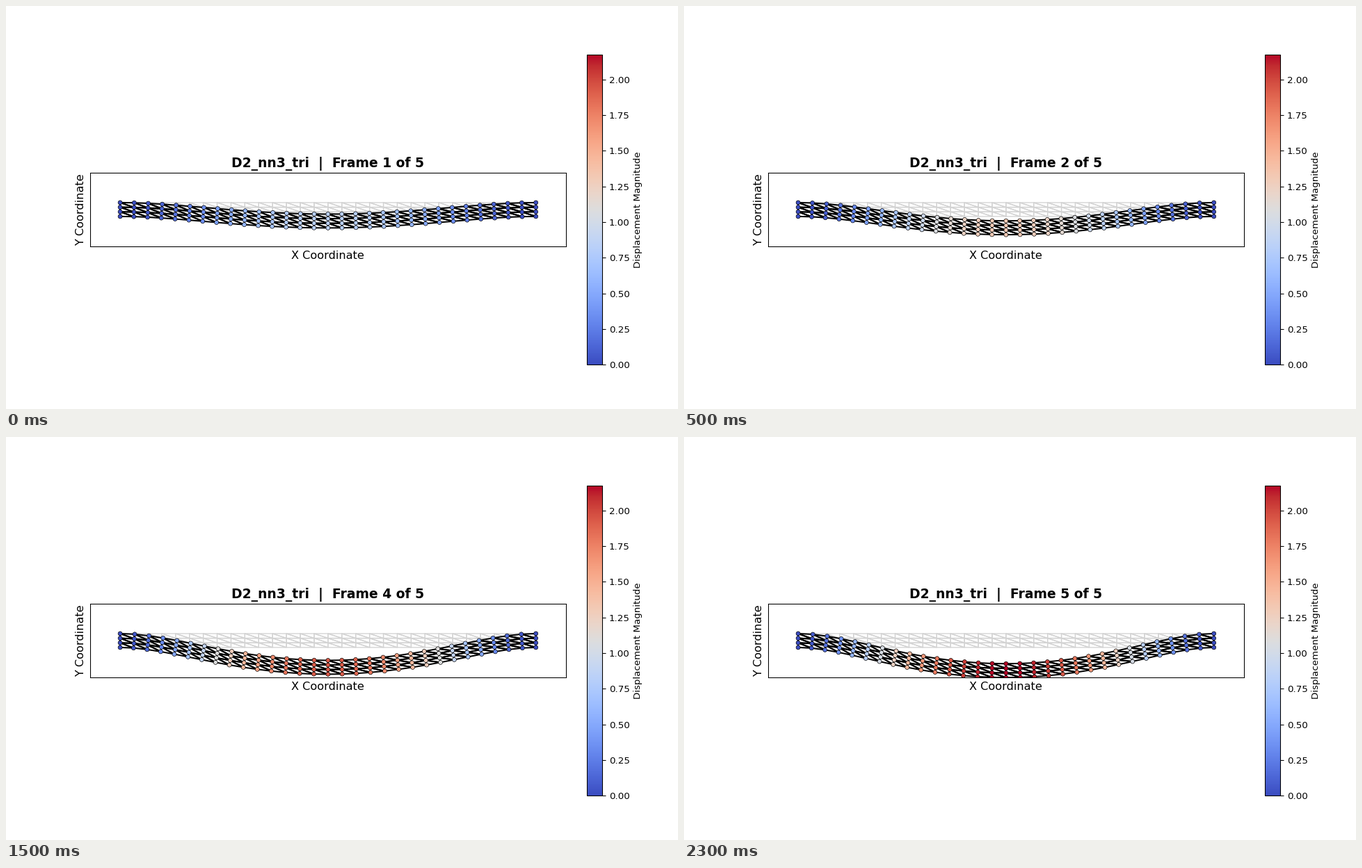
A matplotlib script that plays this animation: 966x580 px, repeating every 2.5 s.

```python
import numpy as np
import matplotlib.pyplot as plt
from matplotlib.animation import FuncAnimation
from matplotlib.collections import LineCollection

DPI = 96
SCALE = 966 / 960                      # a 10 inch wide layout on a 966 px stage
LENGTH, HEIGHT, NX, NY = 30.0, 1.0, 30, 3
SAGS = [0.83, 1.32, 1.67, 1.935, 2.176]  # midspan deflection per load step
PEAK = SAGS[-1]

plt.rcParams["font.family"] = "DejaVu Sans"
plt.rcParams["font.size"] = 10 * SCALE


def mesh():
    """Nodes and closed triangles of a regular beam mesh."""
    xs, ys = np.meshgrid(np.linspace(0, LENGTH, NX + 1),
                         np.linspace(0, HEIGHT, NY + 1))
    nodes = np.column_stack([xs.ravel(), ys.ravel()])
    loops = []
    for j in range(NY):
        for i in range(NX):
            a = j * (NX + 1) + i
            b, c = a + 1, a + NX + 1
            d = c + 1
            loops += [[a, b, c, a], [b, d, c, b]]
    return nodes, np.array(loops)


def deflect(nodes, sag):
    """Clamped beam under uniform load, stiffened by its own stretching."""
    k = 3.9 * sag
    s = np.linspace(0, 1, 1201)
    c = 1 / (2 * k * np.sinh(k / 2))
    w = s * (1 - s) / 2 - c * (np.cosh(k / 2) - np.cosh(k * (s - 0.5)))
    w *= -sag / w.max()
    slope = np.gradient(w, s * LENGTH)
    # axial shift: uniform strain minus the part used up by rotation
    stretch = np.cumsum(slope ** 2) / 2 * LENGTH / (len(s) - 1)
    axial = s * stretch[-1] - stretch

    pos = nodes[:, 0] / LENGTH
    arm = nodes[:, 1] - HEIGHT / 2
    angle = np.arctan(np.interp(pos, s, slope))
    u = np.interp(pos, s, axial) - arm * np.sin(angle)
    v = np.interp(pos, s, w) + arm * (np.cos(angle) - 1)
    fixed = (pos == 0) | (pos == 1)
    u[fixed] = v[fixed] = 0
    return np.column_stack([u, v])


nodes, loops = mesh()

fig, ax = plt.subplots(figsize=(966 / DPI, 580 / DPI), dpi=DPI)
ax.add_collection(LineCollection(nodes[loops], colors="lightgray",
                                 linewidths=1.0 * SCALE, zorder=1))
beam = LineCollection(nodes[loops], colors="black",
                      linewidths=1.5 * SCALE, zorder=2)
ax.add_collection(beam)
dots = ax.scatter(nodes[:, 0], nodes[:, 1], c=np.zeros(len(nodes)), s=20,
                  cmap="coolwarm", vmin=0, vmax=PEAK, edgecolors="black",
                  linewidths=0.5, zorder=3)

ax.set_xlim(-PEAK, LENGTH + PEAK)
ax.set_ylim(-PEAK, HEIGHT + PEAK)
ax.set_aspect("equal")
ax.set_xticks([])
ax.set_yticks([])
ax.set_xlabel("X Coordinate", fontsize=12 * SCALE)
ax.set_ylabel("Y Coordinate", fontsize=12 * SCALE)
title = ax.set_title("", fontsize=14 * SCALE, fontweight="bold")
fig.colorbar(dots, ax=ax, fraction=0.046, pad=0.04,
             label="Displacement Magnitude")


def update(step):
    shift = deflect(nodes, SAGS[step])
    moved = nodes + shift
    beam.set_segments(moved[loops])
    dots.set_offsets(moved)
    dots.set_array(np.hypot(shift[:, 0], shift[:, 1]))
    title.set_text(f"D2_nn3_tri  |  Frame {step + 1} of {len(SAGS)}")
    return beam, dots, title


anim = FuncAnimation(fig, update, frames=len(SAGS), interval=500,
                     repeat=True, repeat_delay=0, blit=False)
plt.show()
```
